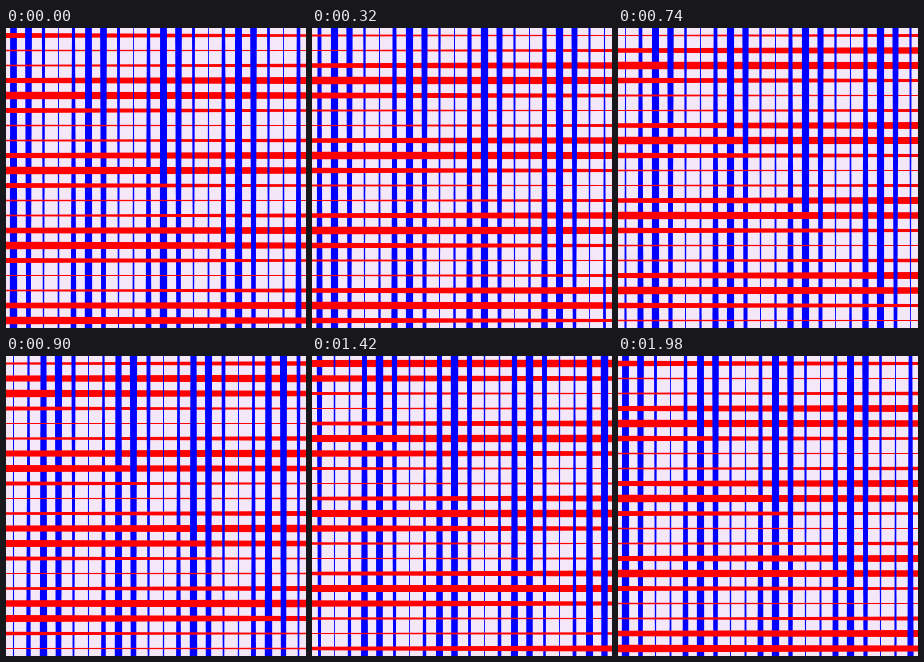
Animation of 300x300 px, one loop 2000 ms. Source, as an HTML page with a canvas:

```html
<!DOCTYPE html>
<html>
<head>
<meta charset="utf-8">
<style>
html, body { margin: 0; width: 100%; height: 100%; overflow: hidden; background: #f4e8f8; }
canvas { display: block; }
</style>
</head>
<body>
<canvas id="stage" width="300" height="300"></canvas>
<script>
const ctx = document.getElementById('stage').getContext('2d');
const SIZE = 300, GAP = 15, LOOP = 2000, STEP = 20;
const PERIOD = 74.5; // distance between two thick lines
const THIN = 0.8, THICK = 7.4;

// Half the line width at a distance from the crest of the wave
function half(d) {
  const wave = (1 + Math.cos(2 * Math.PI * d / PERIOD)) / 2;
  return (THIN + (THICK - THIN) * wave) / 2;
}

// Tapered bar across the stage at position p, with a wave crest for each end
function bar(p, startCrest, endCrest, vertical, color) {
  const a = half(p - startCrest), b = half(p - endCrest);
  const corners = [[0, p - a], [SIZE, p - b], [SIZE, p + b], [0, p + a]];
  ctx.fillStyle = color;
  ctx.beginPath();
  for (const [along, across] of corners) {
    if (vertical) ctx.lineTo(across, along);
    else ctx.lineTo(along, across);
  }
  ctx.fill();
}

function draw(now) {
  const t = Math.floor(now % LOOP / STEP) * STEP / LOOP;
  const shift = PERIOD * t;
  ctx.fillStyle = '#f4e8f8';
  ctx.fillRect(0, 0, SIZE, SIZE);
  // Alternating order weaves the two sets along the diagonal
  for (let p = GAP / 2; p < SIZE; p += GAP) {
    bar(p, 164.5 + shift, 155 + shift, true, '#00f');
    bar(p, 142 - shift, 132.5 - shift, false, '#f00');
  }
}

const start = performance.now();
function loop() {
  draw(performance.now() - start);
  requestAnimationFrame(loop);
}
loop();
</script>
</body>
</html>
```
